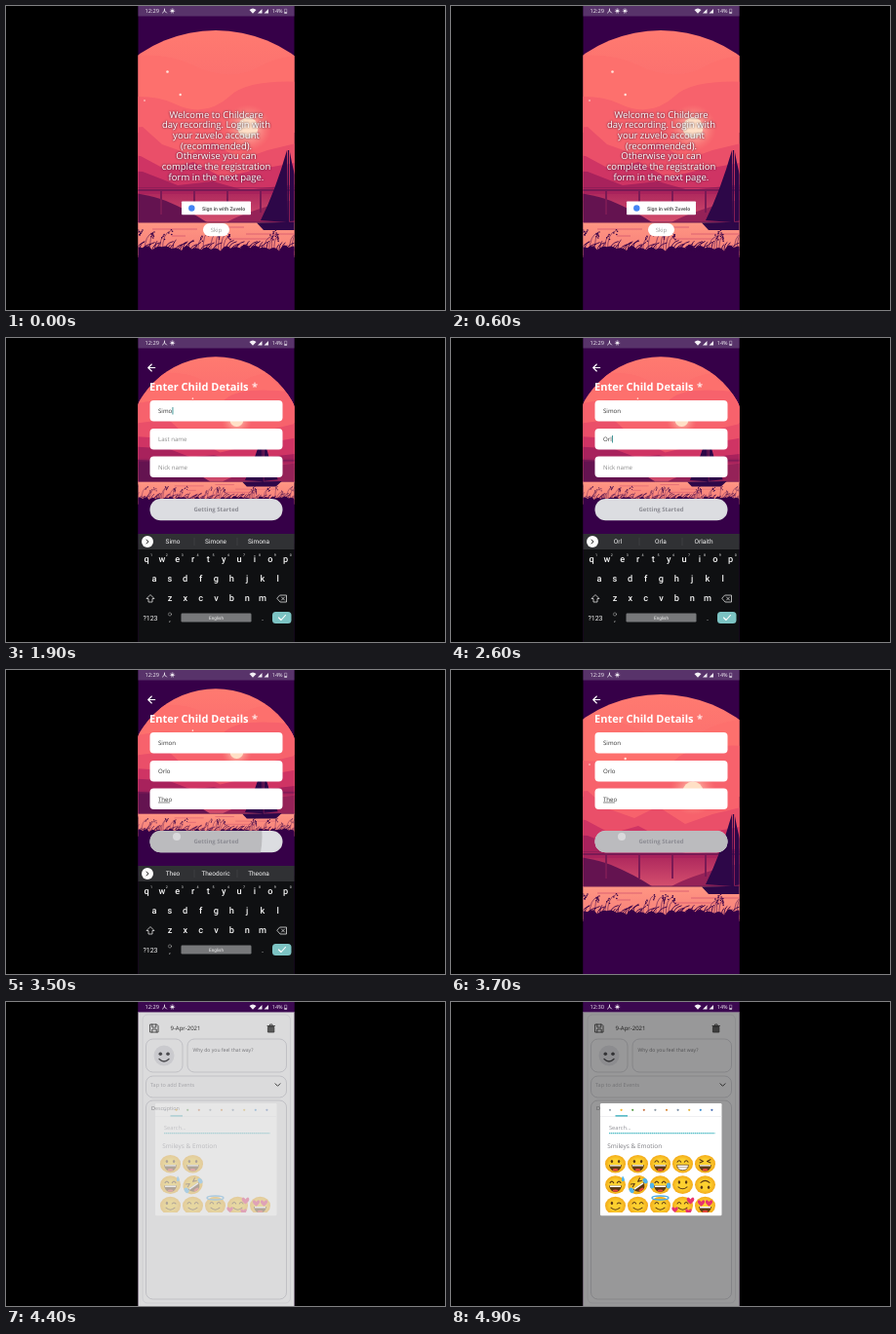
Animation, 450 px wide and 312 px high, one loop 5000 ms. Source, as an HTML page:

```html
<!DOCTYPE html>
<html lang="en">
<head>
<meta charset="utf-8">
<title>Childcare day recording</title>
<style>
html, body { margin: 0; width: 100%; height: 100%; overflow: hidden; background: #000; }
svg { display: block; width: 100vw; height: 100vh; }
text { font-family: "Open Sans", "Noto Sans", sans-serif; text-rendering: geometricPrecision; }
.mid { text-anchor: middle; }
.welcome text { font-size: 9.5px; fill: #fff; }
.welcome .lines { filter: drop-shadow(.3px .6px .8px #1a0420); }
.title { font-size: 11px; font-weight: 700; fill: #fff; }
.entry { font-size: 6.1px; }
.kb text { font-family: Roboto, "Open Sans", sans-serif; fill: #f4f4f4; text-anchor: middle; }
.kb .key { font-size: 9.2px; font-weight: 500; }
.kb .num { font-size: 3.6px; }
.kb .hint { font-size: 6.5px; }
.line { fill: none; stroke-linecap: round; stroke-linejoin: round; }
.box { fill: #fdfdfe; stroke: #cfcfd6; stroke-width: .7; }
</style>
</head>
<body>
<svg viewBox="0 0 450 312">
  <defs>
    <clipPath id="phone"><rect x="135.5" width="160" height="312"/></clipPath>
    <clipPath id="sun"><circle cx="215" cy="163" r="138"/></clipPath>
    <clipPath id="pill"><rect x="147.500" y="165" width="136" height="22.300" rx="11.100"/></clipPath>
    <clipPath id="list"><rect x="153" y="152" width="124.500" height="64"/></clipPath>
    <linearGradient id="sky" x2="0" y2="1">
      <stop stop-color="#ff7b70"/><stop offset=".5" stop-color="#f8646e"/><stop offset="1" stop-color="#f98a7e"/>
    </linearGradient>
    <linearGradient id="bay" x2="0" y2="1"><stop stop-color="#b02a5e"/><stop offset="1" stop-color="#d5506e"/></linearGradient>
    <linearGradient id="sea" x2="0" y2="1"><stop stop-color="#ff9683"/><stop offset="1" stop-color="#f57c78"/></linearGradient>
    <radialGradient id="glow"><stop offset=".3" stop-color="#ffe0c8" stop-opacity=".6"/><stop offset="1" stop-color="#ff9a80" stop-opacity="0"/></radialGradient>
    <radialGradient id="gold"><stop offset=".5" stop-color="#fdd02f"/><stop offset="1" stop-color="#f3ab1a"/></radialGradient>
  </defs>
  <rect width="450" height="312"/>
  <g clip-path="url(#phone)">
    <rect x="135" width="161" height="312" fill="#360048"/>

    <g id="scene">
      <g clip-path="url(#sun)">
        <rect x="70" y="20" width="290" height="236" fill="url(#sky)"/>
        <path d="M70 62Q150 40 190 60T260 62T360 52V130H70Z" fill="#fd706d"/>
        <path d="M70 104Q140 84 172 100T230 92T360 84V200H70Z" fill="#f7626c"/>
        <circle cx="248" cy="125" r="24" fill="url(#glow)"/>
        <circle cx="248" cy="125" r="10.500" fill="#ffe0c6"/>
        <path d="M70 132L140 124L160 142L188 152L212 140L240 158L268 148L360 126V200H70Z" fill="#ea4f69"/>
        <path d="M70 150L138 154L164 168L192 160L222 176L256 168L360 150V200H70Z" fill="#cf3464"/>
        <path d="M70 166L140 170L176 184L212 180L244 189L360 176V200H70Z" fill="#a8225c"/>
      </g>
      <rect x="70" y="193" width="290" height="30" fill="url(#bay)"/>
      <rect x="70" y="222" width="290" height="36" fill="url(#sea)"/>
      <path d="M70 186Q140 190 164 200T206 222H70Z" fill="#641350"/>
      <path d="M360 192Q300 196 270 205T226 222H360Z" fill="#952258"/>
      <path d="M70 189H360M159 189V214M193 189V214M227 189V214M261 189V212" stroke="#7a1a55" stroke-width="2"/>
      <path d="M70 186.500H360" stroke="#7a1a55" stroke-width=".5"/>
      <path d="M70 222H360" stroke="#6a1a52" stroke-width="1"/>
      <path d="M150 229H196M214 227H244M170 236H184M228 239H280M246 234H310" stroke="#d85c70" stroke-width=".9"/>
      <path d="M288 148Q276 190 261 220L289 222ZM291 150Q297 186 313 219L291 221ZM257 222.500L319 221.500L310 230H264Z" fill="#2d0748"/>
      <path d="M289.500 148V226" stroke="#2d0748" stroke-width="1.300"/>
      <g fill="#ffe4dc"><circle cx="165.500" cy="67.500" r="1.300"/><circle cx="178.700" cy="91" r="1.200"/><circle cx="142" cy="97" r=".8"/></g>
      <g id="grass" fill="#360048" stroke="#360048"></g>
    </g>

    <g class="welcome" id="welcome">
      <g class="lines mid" id="lines"></g>
      <rect x="180" y="200.500" width="71" height="13.800" rx=".8" fill="#fff"/>
      <circle cx="190.300" cy="207.500" r="3.200" fill="#4285f4"/>
      <text x="201" y="209.600" style="font:700 5.200px Roboto,sans-serif;fill:#5c5c5c">Sign in with Zuvelo</text>
      <rect x="202" y="223" width="27" height="13.200" rx="6.600" fill="#fff"/>
      <text x="215.500" y="231.800" class="mid" style="font-size:5.900px;fill:#9a9a9a">Skip</text>
    </g>

    <g id="form">
      <path d="M152.700 30.500H146M149.300 27L145.700 30.500L149.300 34" class="line" stroke="#fff" stroke-width="1.100"/>
      <text x="147" y="54" class="title">Enter Child Details</text>
      <text x="252" y="54" class="title" style="fill:#ffe6e4">*</text>
      <g fill="#fff"><rect x="147.500" y="64" width="136" height="21.500" rx="4"/><rect x="147.500" y="93" width="136" height="21.500" rx="4"/><rect x="147.500" y="121.500" width="136" height="21.500" rx="4"/></g>
      <g id="entries"></g>
      <rect id="caret" width=".8" height="7.500" fill="#147f80"/>
      <path id="under" d="M156 136H168" stroke="#333" stroke-width=".6"/>
      <rect x="147.500" y="165" width="136" height="22.300" rx="11.100" fill="#dcdde1"/>
      <g clip-path="url(#pill)" id="press">
        <circle id="ripple" cx="175" cy="171" fill="#bbbbbe"/>
        <circle cx="175" cy="171" r="4" fill="#d9d9db"/>
      </g>
      <text x="215.500" y="178.400" class="mid" style="font-size:6px;font-weight:700;fill:#8d8d94">Getting Started</text>
    </g>

    <rect id="gap" x="135" y="201" width="161" height="4" fill="#f4f4f6"/>
    <g id="kb" class="kb">
      <rect x="135" y="201" width="161" height="112" fill="#0f1012"/>
      <rect x="135" y="201" width="161" height="16" fill="#303134"/>
      <circle cx="145" cy="209" r="6" fill="#fff"/>
      <path id="arrow" class="line" stroke="#333" stroke-width="1"/>
      <g id="tools" class="line" stroke="#bbb" stroke-width=".8">
        <path d="M163.500 206H169.500V210L167.500 212H163.500ZM165 209.500Q166.500 211 168 209.500"/>
        <circle cx="213" cy="209" r="2.300"/><circle cx="213" cy="209" r="3.200" stroke-dasharray="1 1.510"/>
        <path d="M233 206H237V210H233ZM236 208.500H240V212.500H236ZM237 211.500L238 209.500L239 211.500"/>
        <path d="M261.500 209H261.600M264.300 209H264.400M267.100 209H267.200" stroke-width="1.500"/>
        <text x="189" y="211" stroke="none" style="font-size:5.200px;font-weight:700;fill:#bbb">GIF</text>
      </g>
      <g id="hints">
        <path d="M193 205V213M237 205V213" stroke="#48494c" stroke-width=".6"/>
        <text class="hint" x="171" y="211.300"></text><text class="hint" x="215" y="211.300"></text><text class="hint" x="259" y="211.300"></text>
      </g>
      <g id="keys"></g>
      <path id="shift" d="M148 263.500L152 267.500H150V271H146V267.500H144Z" stroke="#ddd" stroke-width=".8"/>
      <path d="M281 264H287.500V271H281L278 267.500ZM282.500 266L285.500 269M285.500 266L282.500 269" class="line" stroke="#ddd" stroke-width=".8"/>
      <text x="148" y="289.600" style="font-size:7px">?123</text>
      <text x="168" y="291" style="font-size:7px">,</text>
      <circle cx="168" cy="283.500" r="1.600" class="line" stroke="#bbb" stroke-width=".5"/>
      <rect x="179.500" y="282.500" width="72" height="9" rx="1.200" fill="#77787a"/>
      <text x="215.500" y="288.800" style="font-size:4.600px">English</text>
      <text x="263" y="289.500" style="font-size:8px">.</text>
      <rect x="273" y="281" width="19.500" height="12" rx="3.500" fill="#7cc3c3"/>
      <path d="M279.500 287L282 289.500L286.500 284.500" class="line" stroke="#fff" stroke-width="1.100"/>
    </g>

    <g id="diary">
      <rect x="135" y="10" width="161" height="302" fill="#fdfdfe"/>
      <rect x="140" y="13" width="151.500" height="296" rx="5" class="box" style="stroke:#e4e4ea"/>
      <g class="line" stroke="#444" stroke-width=".9">
        <path d="M148 23H154.500L156 24.500V31H148ZM149.800 23V26H153.800V23M149.800 31V28H154.200V31"/>
        <path d="M268 24.500H275.500M270.500 24V23H273V24"/>
        <path d="M268.800 25.500H274.800V31H268.800Z" fill="#666"/>
        <path d="M276 83.800L278.500 86.300L281 83.800"/>
      </g>
      <text x="168.500" y="29" style="font-size:6px;fill:#2c2c2c;font-weight:500">9-Apr-2021</text>
      <rect x="143.500" y="38" width="37.500" height="34" rx="7" class="box"/>
      <rect x="186" y="38" width="101.500" height="34" rx="7" class="box"/>
      <rect x="143.500" y="76" width="144" height="22" rx="7" class="box"/>
      <rect x="143.500" y="101" width="144" height="204" rx="7" class="box"/>
      <path d="M276 83.800L278.500 86.300L281 83.800" class="line" stroke="#444" stroke-width="1"/>
      <circle cx="162" cy="55" r="10.500" fill="#e9e9ed"/>
      <g fill="#55555a"><circle cx="158.300" cy="53.300" r="1.800"/><circle cx="166" cy="53.300" r="1.800"/></g>
      <path d="M157 58.500Q162 63.500 167 58.500" class="line" stroke="#55555a" stroke-width="1.300"/>
      <text x="191.500" y="51" style="font-size:5.100px;fill:#85858a">Why do you feel that way?</text>
      <text x="148" y="87" style="font-size:5.500px;fill:#bcbcc2">Tap to add Events</text>
      <text x="149" y="110.600" style="font-size:5.400px;fill:#8c8c92">Description</text>
    </g>

    <rect id="bar" x="135" width="161" height="10.500"/>
    <g fill="#f2eef4">
      <text id="clock" x="142.500" y="7.200" style="font-size:5.700px"></text>
      <path d="M162.500 3V5L160.500 7M162.500 5L164.500 7" class="line" stroke="#f2eef4" stroke-width=".9"/>
      <circle cx="170.500" cy="5" r="1.500"/><circle cx="170.500" cy="5" r="2.200" fill="none" stroke="#f2eef4" stroke-width=".7" stroke-dasharray=".9 .830"/>
      <g id="notice"><circle cx="178.300" cy="5" r="1.500"/><circle cx="178.300" cy="5" r="2.200" fill="none" stroke="#f2eef4" stroke-width=".7" stroke-dasharray=".9 .830"/></g>
      <path d="M249.500 4Q253 1 256.500 4L253 7.800ZM258 7.500L262.500 3V7.500ZM264.500 7.500L269 3V7.500Z"/>
      <text x="272.800" y="7.200" style="font-size:5.500px">14%</text>
      <path d="M285.500 3.200H287.800V7.500H285.500Z" fill="none" stroke="#c9bfd0" stroke-width=".5"/>
      <rect x="285.500" y="6.300" width="2.300" height="1.200"/>
    </g>

    <rect id="dim" x="135" y="10.500" width="161" height="302"/>
    <g id="dialog">
      <rect x="153" y="104" width="124.500" height="115.300" rx="1.200" fill="#fff"/>
      <g id="tabs"></g>
      <path d="M153 117.500H277.500" stroke="#e6e6ea" stroke-width=".6"/>
      <path d="M168.500 116.900H181" stroke="#28a9b8" stroke-width="1.200"/>
      <text x="162" y="131" style="font-size:5.700px;fill:#929298">Search...</text>
      <path d="M162 134.700H270.500" stroke="#22a9b6" stroke-width="1.100" stroke-dasharray="1.500 .5"/>
      <text x="160.300" y="150" style="font-size:6.450px;fill:#7d7d82">Smileys &amp; Emotion</text>
      <g clip-path="url(#list)"><g id="faces"></g><g id="late"></g></g>
    </g>
  </g>
</svg>
<script>
const $ = id => document.getElementById(id);
const clamp = v => Math.min(1, Math.max(0, v));
const ramp = (t, a, b) => clamp((t - a) / (b - a));
const show = (id, v) => {
  const s = $(id).style;
  s.opacity = +v;
  s.visibility = +v > 0 ? 'visible' : 'hidden';
};

// Welcome text
$('lines').innerHTML = ['Welcome to Childcare', 'day recording. Login with', 'your zuvelo account',
  '(recommended).', 'Otherwise you can', 'complete the registration', 'form in the next page.']
  .map((s, i) => `<text x="215.5" y="${114.6 + i * 10.65}">${s}</text>`).join('');

// Reeds on the bank
let seed = 7;
const rnd = () => (seed = seed * 16807 % 2147483647) / 2147483647;
let reeds = '<path stroke="none" d="M70 250';
for (let x = 70; x < 360; x += 10) reeds += `Q${x + 5} ${241 + rnd() * 6} ${x + 10} ${247 + rnd() * 5}`;
reeds += 'V320H70Z"/>';
for (let x = 72; x < 360; x += 2.6) {
  const tall = rnd() > .72, h = tall ? 12 + rnd() * 8 : 4 + rnd() * 6;
  const lean = 2 + rnd() * 7, tip = x + lean, top = 250 - h;
  reeds += `<path class="line" stroke-width="${tall ? .5 : .9}" d="M${x} 251Q${x} ${top + 2} ${tip} ${top}"/>`;
  if (tall) for (let i = 0; i < 4; i++)
    reeds += `<circle stroke="none" cx="${tip - 2 + rnd() * 4}" cy="${top + i * 1.6 - 1}" r=".8"/>`;
}
$('grass').innerHTML = reeds;

// Keyboard
const rows = [['qwertyuiop', 144, 230], ['asdfghjkl', 152, 250], ['zxcvbnm', 168, 270.2]];
$('keys').innerHTML = rows.map(([s, x, y], r) => [...s].map((c, i) => {
  const px = x + i * 15.85;
  return `<text class="key" x="${px}" y="${y}">${c}</text>` +
    (r ? '' : `<text class="num" x="${px + 5}" y="223.5">${(i + 1) % 10}</text>`);
}).join('')).join('');
const keys = [...document.querySelectorAll('.key')];
const hints = [...document.querySelectorAll('.hint')];

// Form entries
const fields = [
  { blank: 'First name', word: 'Simon', focus: 1100, at: 1400, step: 130, y: 77, more: ['Simone', 'Simona'] },
  { blank: 'Last name', word: 'Orlo', focus: 2200, at: 2400, step: 100, y: 106, more: ['Orla', 'Orlaith'] },
  { blank: 'Nick name', word: 'Theo', focus: 2850, at: 3000, step: 100, y: 134.5, more: ['Theodoric', 'Theona'] }
];
for (const f of fields) {
  f.el = document.createElementNS('http://www.w3.org/2000/svg', 'text');
  f.el.setAttribute('class', 'entry');
  f.el.setAttribute('x', 156);
  f.el.setAttribute('y', f.y);
  $('entries').append(f.el);
}

// Emoji
const ink = '#5d3a14';
const stroke = (d, c = ink, w = 1.1) => `<path class="line" d="${d}" stroke="${c}" stroke-width="${w}"/>`;
const heart = (x, y, s) => `<path transform="translate(${x} ${y}) scale(${s})" d="M0 3Q-4 0 -3 -2T0 -1.2Q2 -4 3 -2T0 3Z" fill="#e8336e"/>`;
const eyes = {
  dot: `<ellipse cx="-3.6" cy="-2.6" rx="1.2" ry="1.7" fill="${ink}"/><ellipse cx="3.6" cy="-2.6" rx="1.2" ry="1.7" fill="${ink}"/>`,
  arc: stroke('M-5.500 -2Q-3.600 -5 -1.800 -2M1.800 -2Q3.600 -5 5.500 -2'),
  squint: stroke('M-5.500 -4.500L-2 -2.800L-5.500 -1.200M5.500 -4.500L2 -2.800L5.500 -1.200'),
  wink: `<ellipse cx="-3.6" cy="-2.6" rx="1.2" ry="1.7" fill="${ink}"/>` + stroke('M1.800 -2Q3.600 -4 5.500 -2'),
  heart: heart(-4, -2.6, 1.15) + heart(4, -2.6, 1.15)
};
const mouths = {
  open: `<path d="M-6.500 1H6.500Q5.500 7.300 0 7.300T-6.500 1Z" fill="${ink}"/><path d="M-5.500 1H5.500V2.400H-5.500Z" fill="#fff"/><ellipse cy="6" rx="2.800" ry="1.200" fill="#e8483c"/>`,
  grin: `<path d="M-6 1H6Q5.500 6.500 0 6.500T-6 1Z" fill="#fff" stroke="${ink}" stroke-width=".7"/>` + stroke('M-5.500 3.400H5.500', ink, .4),
  smile: stroke('M-4.500 2.200Q0 6.200 4.500 2.200')
};
const extras = {
  sweat: '<path d="M7.500 -9Q11 -4 8 -3.500T7.500 -9Z" fill="#4fb4ee"/>',
  tears: '<ellipse cx="-8.500" cy="1" rx="2.200" ry="3" fill="#4fb4ee"/><ellipse cx="8.500" cy="1" rx="2.200" ry="3" fill="#4fb4ee"/>',
  halo: '<ellipse cy="-8" rx="8.500" ry="2" fill="none" stroke="#4aa9e6" stroke-width="1.400"/>',
  love: heart(-8, 4, 1) + heart(8, -5, 1.2) + heart(6, 6, 1)
};
const face = (x, y, [eye, mouth, extra, turn = 0]) =>
  `<g transform="translate(${x} ${y}) rotate(${turn})"><ellipse rx="10.5" ry="9.3" fill="url(#gold)"/>${eyes[eye]}${mouths[mouth]}${extras[extra] || ''}</g>`;
const moods = [
  ['dot', 'open'], ['dot', 'open'], ['arc', 'open'], ['arc', 'grin'], ['squint', 'open'],
  ['arc', 'open', 'sweat'], ['squint', 'open', 'tears', -35], ['arc', 'open', 'tears'], ['dot', 'smile'], ['dot', 'smile', '', 180],
  ['wink', 'smile'], ['arc', 'smile'], ['arc', 'smile', 'halo'], ['arc', 'smile', 'love'], ['heart', 'open']
];
moods.forEach((m, i) => {
  const col = i % 5, row = (i - col) / 5;
  const home = col > 1 && row < 2 ? 'late' : 'faces';
  $(home).innerHTML += face(168.5 + col * 23, 166.2 + row * 21.4, m);
});
$('tabs').innerHTML = ['#9aa4ad', '#f0b429', '#5a9e4b', '#c9764a', '#8d9aa5', '#d98a3c', '#7b8fa6', '#e0b13a', '#3f8fd0', '#4a6fb5']
  .map((c, i) => `<circle cx="${163 + i * 11.6}" cy="110.8" r="1.1" fill="${c}"/>`).join('');

function draw(t) {
  const onForm = ramp(t, 600, 900), page = ramp(t, 3700, 4000);
  const small = t >= 900 && t < 3600;
  $('scene').setAttribute('transform', small ? 'translate(75.25 3) scale(.65)' : '');
  show('scene', page < 1);
  show('welcome', 1 - onForm);
  show('form', page < 1 ? onForm : 0);

  const active = fields.filter(f => t >= f.focus).pop() || fields[0];
  for (const f of fields) {
    f.text = t < f.at ? '' : f.word.slice(0, Math.floor((t - f.at) / f.step) + 1);
    f.el.textContent = f.text || f.blank;
    f.el.style.fill = f.text ? '#303030' : '#8b8b8b';
  }
  const caret = $('caret');
  caret.setAttribute('x', 156 + (active.text ? active.el.getComputedTextLength() + .3 : 0));
  caret.setAttribute('y', active.y - 6);
  show('caret', t >= 1100 && t < 3350);
  show('under', t >= 3300 && page < 1);

  show('press', t >= 3400 && page < 1);
  $('ripple').setAttribute('r', 30 + 115 * ramp(t, 3400, 3600));

  const up = 160 * (1 - ramp(t, 900, 1300)) ** 3;
  const drop = 112 * ramp(t, 3500, 3700);
  $('kb').setAttribute('transform', `translate(0 ${up + drop})`);
  show('kb', t >= 900 && t < 3700);
  show('gap', t >= 1100 && t < 1300);
  const caps = !active.text;
  keys.forEach(k => k.textContent = caps ? k.textContent.toUpperCase() : k.textContent.toLowerCase());
  $('shift').setAttribute('fill', caps ? '#ddd' : 'none');
  show('tools', caps);
  show('hints', !caps);
  $('arrow').setAttribute('d', caps ? 'M146 207L144 209L146 211' : 'M144 207L146 209L144 211');
  [active.text, ...active.more].forEach((s, i) => hints[i].textContent = s);

  show('diary', page);
  $('bar').setAttribute('fill', page > .5 ? '#3b0850' : '#58336a');
  $('clock').textContent = t < 4500 ? '12:29' : '12:30';
  show('notice', t >= 300 && t < 1700);

  const open = ramp(t, 4300, 4600);
  show('dim', open * .4);
  show('dialog', open);
  show('late', open * ramp(t, 4600, 4900));
}

function tick() {
  const t = (performance.now() + 4) % 5000;
  draw(Math.floor(t / 100) * 100);
  requestAnimationFrame(tick);
}
tick();
</script>
</body>
</html>
```
